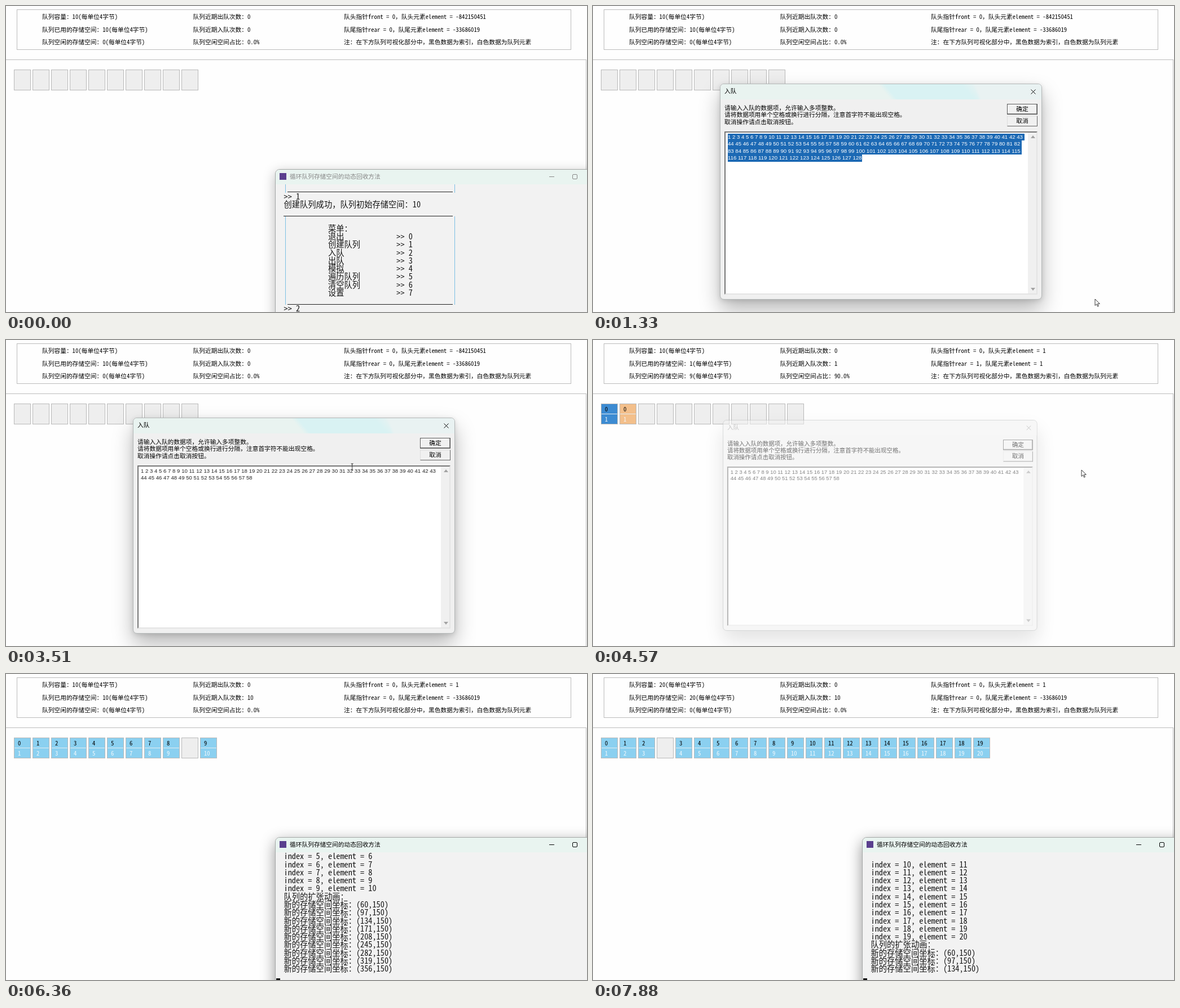
Animation, 1030 px wide and 544 px high, one loop 8000 ms. Source, as an HTML page:

```html
<!DOCTYPE html>
<html lang="zh-CN">
<head>
<meta charset="utf-8">
<title>循环队列</title>
<style>
html, body { margin: 0; width: 100%; height: 100%; overflow: hidden; background: #fefefe; }
#stage { position: relative; width: 1030px; height: 544px; overflow: hidden; background: #fefefe; color: #000;
  font: 10.72px/12px "Noto Sans Mono CJK SC", "Noto Sans CJK SC", "Noto Sans CJK", monospace; }
#stage div, #stage svg { position: absolute; box-sizing: border-box; white-space: pre; }
#labels, #cells, #content, #mouse { left: 0; top: 0; }
#info { left: 19px; top: 6px; width: 983px; height: 72px; border: 1px solid #bcbcbc; }
#field { left: -2px; top: 95px; width: 1031px; height: 460px; border: 1px solid #bcbcbc; }
.cell { top: 113px; width: 30px; height: 37px; border: 1px solid #b9b9b9; background: #eee; }
.cell.item { background: #8bd0f0; }
.cell.front { background: #3c8bd2; }
.cell.rear { background: #f3bf8b; }
.cell.item::after { content: ""; position: absolute; left: 0; right: 0; top: 17px; height: 1px; background: #e4eef4; }
.cell div { left: 6px; top: 2.5px; font-weight: 500; }
.cell div + div { top: 20.5px; color: #f4f8fb; font-weight: 400; }
.ui { font-family: "Noto Sans CJK SC", "Noto Sans CJK", sans-serif; }

#console { left: 477px; top: 290px; width: 620px; height: 300px; border: 1px solid #a4a7a6; border-radius: 8px;
  background: #f2f2f2; box-shadow: 0 8px 26px rgba(0,0,0,.42); }
#console.idle { box-shadow: 0 6px 22px rgba(0,0,0,.28); }
#bar { left: 0; top: 0; width: 100%; height: 26px; background: #e9f4f0; border-radius: 7px 7px 0 0; }
#bar .icon { left: 7px; top: 6px; width: 12px; height: 12px; background: #5a3f8e; }
#bar .name { left: 25px; top: 5.5px; }
#bar .min { left: 485px; top: 12px; width: 9px; height: 1px; background: currentColor; }
#bar .max { left: 526px; top: 8px; width: 9px; height: 9px; border: 1px solid; border-radius: 2px; }
#rows { left: .3px; top: 26.4px; font-size: 14.27px; font-weight: 300; color: #151515; }
#rows .row { left: 0; height: 14.27px; line-height: 12.5px; }
#rows .rule { top: 13.1px; height: 1px; background: #222; }
#rows .side { top: 0; width: 1px; height: 14.3px; }
#rows .block { left: .7px; top: 10px; width: 7px; height: 4px; background: #111; }

#dialog { left: 0; top: 0; width: 571px; height: 384px; transform-origin: 0 0; border: 1px solid #b4b8b8; border-radius: 7px;
  background: #f0f0f0; box-shadow: 0 18px 36px rgba(0,0,0,.28), 0 2px 8px rgba(0,0,0,.12); }
#dialog.idle { box-shadow: 0 18px 36px rgba(0,0,0,.2); }
#cap { left: 0; top: 0; width: 569px; height: 27px; border-radius: 6px 6px 0 0;
  background: linear-gradient(70deg, transparent 79%, #e9f2f2 80%), linear-gradient(50deg, #e9f3f0 51%, #d9f2f3 53%, #d9f2f3 76%, #e6f2f2 80%); }
.idle > #cap { background: #f3f3f3; color: #999; }
#cap .name { left: 7px; top: 5.5px; }
#cap svg { left: 550px; top: 8.5px; }
.tip { left: 7px; top: 35.5px; line-height: 12.5px; }
.button { left: 508px; width: 54px; height: 19px; line-height: 15px; text-align: center; background: #f0f0f0;
  border: 1px solid; border-color: #ddd #666 #666 #ddd; }
.button.main { border-color: #555; box-shadow: inset -1px -1px #888, inset 1px 1px #fff; }
#edit { left: 7px; top: 84px; width: 555px; height: 290px; background: #fff; border: 2px solid; border-color: #777 #e4e4e4 #e4e4e4 #777; }
#edit .scroll { right: 0; top: 0; width: 15px; height: 100%; background: #f0f0f0; }
#edit svg { left: 540px; top: 0; }
#text { left: 4px; top: 1.5px; font: 9.62px/12.5px "Liberation Sans", Arial, sans-serif; color: #222; }
#text span { display: inline-block; height: 12.5px; vertical-align: top; }
#text .sel { background: #1c69b4; color: #fff; }
</style>
</head>
<body>
<div id="stage">
  <div id="info"></div>
  <div id="field"></div>
  <div id="labels"></div>
  <div id="cells"></div>
  <div id="console">
    <div id="bar"><div class="icon"></div><div class="name ui">循环队列存储空间的动态回收方法</div><div class="min"></div><div class="max"></div></div>
    <div id="rows"></div>
  </div>
  <div id="dialog">
    <div id="cap"><div class="name ui">入队</div>
      <svg width="9" height="9" fill="none" stroke="currentColor"><path d="M.5 .5l8 8m0-8l-8 8"/></svg></div>
    <div id="content">
      <div class="tip">请输入入队的数据项，允许输入多项整数。
请将数据项用单个空格或换行进行分隔，注意首字符不能出现空格。
取消操作请点击取消按钮。</div>
      <div class="button main" style="top:35px">确定</div>
      <div class="button" style="top:56px">取消</div>
      <div id="edit"><div class="scroll"></div>
        <svg width="10" height="286" fill="#a3a3a3"><path d="M1 10l4-5 4 5zM1 276l4 5 4-5z"/></svg>
        <div id="text"></div></div>
    </div>
  </div>
  <svg id="mouse" width="20" height="22" style="overflow:visible">
    <path id="arrow" d="M0 0v11.5l2.7-2.6 1.9 4.3 1.8-.8-1.9-4.1h3.8z" fill="#fff" stroke="#222" stroke-width=".9"/>
    <path id="beam" d="M-2 -5.5h4M0 -5.5v11M-2 5.5h4" fill="none" stroke="#222" stroke-width=".9"/>
  </svg>
</div>
<script>
const LOOP = 8000;
const $ = id => document.getElementById(id);
const range = (from, to) => Array.from({ length: Math.max(0, to - from + 1) }, (_, i) => from + i);

// Queue steps: 10 inserts, 10 gap moves, growth, 10 inserts, 3 gap moves.
const STEPS = [4500, 4630, 4700, 4830, 4970, 5070, 5170, 5270, 5370, 5440,
  5540, 5630, 5700, 5830, 5970, 6030, 6100, 6160, 6300, 6370,
  6460, 6730, 6830, 6920, 7020, 7150, 7210, 7350, 7420, 7520, 7620, 7710, 7800, 7880];

// Rows: time, values...
const MOUSE = [[990, 890, 521], [1660, 890, 521], [2390, 436, 245], [2720, 436, 245], [2980, 481, 270],
  [3200, 481, 270], [3840, 758, 177], [4180, 758, 177], [4570, 866, 231]];
// time, left, top, scale, opacity
const DIALOG = [[960, 244, 153, .88, 0], [1130, 243, 152, .891, .36], [1200, 235, 146, .94, .7], [1330, 225, 138, 1, 1],
  [4490, 225, 138, 1, 1], [4570, 230, 142, .977, .55], [4700, 243, 152, .9, 0]];
const DRAG = [[2780, 66], [2840, 89], [2910, 110], [2980, 128]];

function tween(table, t, ease = x => x) {
  const next = table.findIndex(row => row[0] > t);
  if (next < 1) return (next < 0 ? table.at(-1) : table[0]).slice(1);
  const a = table[next - 1], b = table[next];
  const p = ease((t - a[0]) / (b[0] - a[0]));
  return a.slice(1).map((v, i) => v + (b[i + 1] - v) * p);
}

function queueAt(step) {
  const grown = step > 20;
  const cap = grown ? 20 : 10;
  const size = step ? Math.min(grown ? step - 11 : step, cap) : cap;
  const gap = step - (grown ? 31 : 10);
  return { step, cap, size, gap, added: grown ? size - 10 : step && size };
}

function drawLabels({ step, cap, size, added }) {
  const unit = '(每单位4字节)', full = size === cap;
  const columns = [
    [64, `队列容量：${cap}${unit}`, `队列已用的存储空间：${size}${unit}`, `队列空闲的存储空间：${cap - size}${unit}`],
    [331.5, '队列近期出队次数：0', `队列近期入队次数：${added}`, `队列空闲空间占比：${((cap - size) / cap * 100).toFixed(1)}%`],
    [599, `队头指针front = 0，队头元素element = ${step ? 1 : -842150451}`,
      `队尾指针rear = ${full ? 0 : size}，队尾元素element = ${full ? -33686019 : size}`,
      '注：在下方队列可视化部分中，黑色数据为索引，白色数据为队列元素']];
  $('labels').innerHTML = columns.map(([x, ...lines]) => lines.map((text, i) =>
    `<div style="left:${x}px;top:${13.3 + i * 22.2}px">${text}</div>`).join('')).join('');
}

function drawCells({ step, cap, size, gap }) {
  const empty = { kind: '' };
  let cells = step ? range(1, size).map(value => ({ kind: 'item', value })) : [];
  if (gap > 0) cells.splice(gap, 0, empty);
  else if (step) {
    if (size === 1) cells.push({ ...cells[0] });
    cells[0].kind += ' front';
    cells.at(-1).kind += ' rear';
  }
  const spare = step ? cap - size : cap;
  cells = cells.concat(Array(spare).fill(empty));
  $('cells').innerHTML = cells.map(({ kind, value }, i) =>
    `<div class="cell ${kind}" style="left:${14 + i * 33}px">${value ? `<div>${value - 1}</div><div>${value}</div>` : ''}</div>`).join('');
}

const BLUE = '#7cc0e4', ORANGE = '#dfa76a';
const rule = (from, to) => `<div class="rule" style="left:${from}px;width:${to - from}px"></div>`;
const side = (x, color) => `<div class="side" style="left:${x}px;background:${color}"></div>`;
const sides = (right, color) => side(17, BLUE) + side(right, color);
const indent = '  ';

function menu() {
  const items = ['退出', '创建队列', '入队', '出队', '模拟', '遍历队列', '清空队列', '设置'];
  const pad = ' '.repeat(13), edge = sides(317, BLUE);
  return [rule(14, 314), edge, edge + pad + '菜单：',
    ...items.map((name, i) => `${edge}${pad}${name}${' '.repeat(17 - name.length * 2)}&gt;&gt; ${i}`),
    edge + rule(21, 314)];
}

function consoleLines(step) {
  const lines = [sides(317, BLUE) + rule(21, 314), indent + '&gt;&gt; 1',
    indent + '创建队列成功，队列初始存储空间：10', ...menu(), indent + '&gt;&gt; 2'];
  if (!step) return lines;
  lines.push(...range(1, 58).join(' ').match(/.{1,75}/g), indent + '进队：');
  for (const k of range(1, step)) {
    const { size, gap } = queueAt(k);
    if (k === 21) {
      lines.push(rule(14, 521), sides(524, ORANGE),
        ' '.repeat(7) + 'front = rear = 0，队列进行一次扩容，队列容量扩大至 20',
        sides(524, ORANGE) + rule(21, 521), '');
    } else if (gap > 0) {
      if (gap === 1) lines.push(indent + '队列的扩张动画：');
      lines.push(`${indent}新的存储空间坐标：(${23 + 37 * gap},150)`);
    } else lines.push(`${indent}index = ${size - 1}, element = ${size}`);
  }
  return [...lines, '<div class="block"></div>'];
}

function drawConsole(step) {
  $('rows').innerHTML = consoleLines(step).slice(-16).map((html, i) =>
    `<div class="row" style="top:${i * 14.27}px">${html}</div>`).join('');
}

function drawText(last, from, to) {
  const starts = [1, 44, 83, 116, 129];
  $('text').innerHTML = starts.slice(0, 4).map((first, i) => {
    const end = Math.min(starts[i + 1] - 1, last);
    const cut = (a, b) => range(Math.max(a, first), Math.min(b, end)).map(n => n === last ? n : n + ' ').join('');
    return `<span>${cut(1, from - 1)}</span><span class="sel">${cut(from, to)}</span><span>${cut(Math.max(to + 1, from), 128)}</span>`;
  }).join('\n');
}

function selectionAt(t) {
  if (t >= 3250) return [58, 59, 58];
  if (t < 2590) return [128, 1, 128];
  const reached = DRAG.filter(([time]) => time <= t).at(-1);
  return [128, 59, reached ? reached[1] : 58];
}

const drawn = {};
function refresh(name, key, draw) {
  if (drawn[name] === key) return;
  drawn[name] = key;
  draw();
}

function render(t) {
  const step = STEPS.filter(time => time <= t).length;
  refresh('queue', step, () => {
    const queue = queueAt(step);
    drawLabels(queue);
    drawCells(queue);
    drawConsole(step);
  });

  const consoleIdle = t < 990;
  $('console').style.display = consoleIdle || t >= 4700 ? '' : 'none';
  $('console').className = consoleIdle ? 'idle' : '';
  const [gray] = tween([[200, 135], [530, 152], [4700, 60], [4830, 0]], t);
  $('bar').style.color = `rgb(${gray},${gray},${gray})`;

  const open = t >= 990 && t < 4700;
  const [x, y, scale, opacity] = tween(DIALOG, t);
  Object.assign($('dialog').style, { display: open ? '' : 'none', opacity, transform: `translate(${x}px,${y}px) scale(${scale})` });
  $('dialog').className = t < 1200 || t >= 4500 ? 'idle' : '';
  $('content').style.display = t < 1320 ? 'none' : '';
  const selection = selectionAt(t);
  refresh('text', selection.join(), () => drawText(...selection));

  const [mx, my] = tween(MOUSE, t, p => p * p * (3 - 2 * p));
  const typing = t > 1660 && t < 3840 && mx > 235 && mx < 772 && my > 223 && my < 512;
  Object.assign($('mouse').style, { display: open ? '' : 'none', transform: `translate(${mx}px,${my}px)` });
  $('arrow').style.display = typing ? 'none' : '';
  $('beam').style.display = typing ? '' : 'none';
}

const start = performance.now();
function tick() {
  render((performance.now() - start) % LOOP);
  requestAnimationFrame(tick);
}
tick();
</script>
</body>
</html>
```
